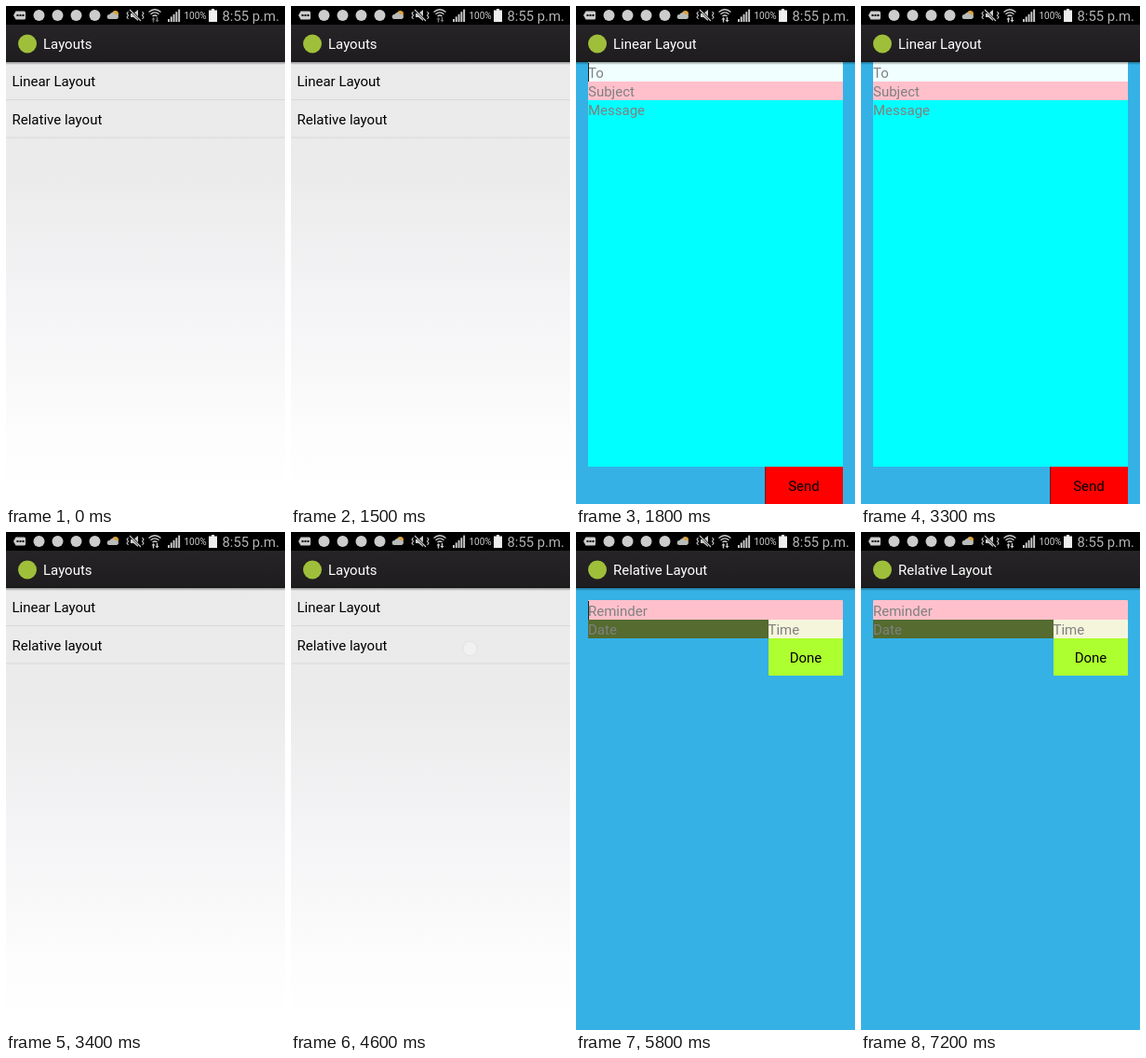
Animation, 300 px wide and 534 px high, one loop 7.7 s. Source, as an HTML page:

```html
<!DOCTYPE html>
<html lang="en">
<head>
<meta charset="utf-8">
<title>Layouts demo</title>
<style>
html, body { margin: 0; width: 100%; height: 100%; overflow: hidden; background: #000; }
svg { display: block; width: 100vw; height: 100vh; }
text { font: 15px Roboto, sans-serif; white-space: pre; }
.hint { fill: #808080; }
</style>
</head>
<body>
<svg viewBox="0 0 300 534" xmlns="http://www.w3.org/2000/svg">
  <defs>
    <linearGradient id="page" x1="0" y1="60" x2="0" y2="534" gradientUnits="userSpaceOnUse">
      <stop offset="0" stop-color="#eaeaea"/>
      <stop offset=".25" stop-color="#ebebec"/>
      <stop offset=".58" stop-color="#f5f4f6"/>
      <stop offset=".85" stop-color="#fdfdfd"/>
      <stop offset="1" stop-color="#fff"/>
    </linearGradient>
    <linearGradient id="bar" x1="0" y1="0" x2="0" y2="1">
      <stop offset="0" stop-color="#262426"/>
      <stop offset="1" stop-color="#1e1c1e"/>
    </linearGradient>
    <linearGradient id="shade" x1="0" y1="0" x2="0" y2="1">
      <stop offset="0" stop-color="#000" stop-opacity=".4"/>
      <stop offset="1" stop-color="#000" stop-opacity="0"/>
    </linearGradient>
  </defs>

  <g id="list">
    <rect y="60" width="300" height="474" fill="url(#page)"/>
    <path d="M0 100.5H300M0 141H300" stroke="#d8d8d8"/>
    <text x="6.5" y="86">Linear Layout</text>
    <text x="6.5" y="126.5">Relative layout</text>
    <circle id="touch" cx="192.5" cy="125" r="7.5" fill="#f1f1f1" stroke="#e4e4e4"/>
  </g>

  <g id="linear">
    <rect y="60" width="300" height="474" fill="#35b1e5"/>
    <rect x="13" y="60" width="274" height="21" fill="#f0ffff"/>
    <rect x="13" y="81" width="274" height="20" fill="#ffc0cb"/>
    <rect x="13" y="101" width="274" height="393" fill="#0ff"/>
    <rect x="203" y="494" width="84" height="40" fill="#f00"/>
    <path d="M203.5 494V534" stroke="#6b1c28"/>
    <text class="hint" x="13" y="76.5">To</text>
    <text class="hint" x="13" y="96.5">Subject</text>
    <text class="hint" x="13" y="117">Message</text>
    <text x="245" y="520" text-anchor="middle">Send</text>
  </g>

  <g id="relative">
    <rect y="60" width="300" height="474" fill="#35b1e5"/>
    <rect x="13" y="73" width="274" height="21" rx="1" fill="#ffc0cb"/>
    <rect x="13" y="94" width="194" height="20" fill="#556b2f"/>
    <rect x="207" y="94" width="80" height="20" fill="#f5f5dc"/>
    <rect x="207" y="114" width="80" height="40" rx="1" fill="#adff2f"/>
    <text class="hint" x="13" y="90">Reminder</text>
    <text class="hint" x="13" y="110">Date</text>
    <text class="hint" x="206.5" y="110">Time</text>
    <text x="247" y="140" text-anchor="middle">Done</text>
  </g>

  <rect id="caret" x="13" width="1" height="20" fill="#222"/>

  <rect y="60" width="300" height="3" fill="url(#shade)"/>
  <rect y="20" width="300" height="40" fill="url(#bar)"/>
  <rect y="59" width="300" height="1" fill="#111"/>
  <circle cx="23" cy="40.5" r="10" fill="#9fbf3b"/>
  <text id="title" x="40" y="46" fill="#fff"></text>

  <rect width="300" height="20" fill="#000"/>
  <g id="status" fill="#ccc">
    <path d="M10.5 5.5H19.5Q21 5.5 21 7V13Q21 14.5 19.5 14.5H10.5L8 10Z"/>
    <path d="M11.5 10h2m1 0h2m1 0h2" stroke="#000" stroke-width="2"/>
    <circle cx="117.500" cy="8.500" r="3.500" fill="#d9a441"/>
    <path d="M111 14a2.500 2.500 0 0 1 .4-5 3.500 3.500 0 0 1 6.200 0 2.500 2.500 0 0 1 1.400 5z" fill="#b8bcb8"/>
    <path d="M134 8h3l5-4v12l-5-4h-3z"/>
    <path d="M133.500 4l11.500 12" stroke="#000" stroke-width="2.500"/>
    <path d="M133 4l12 12M131.500 6l-1.500 2 1.500 2-1.500 2 1.500 2M146.500 6l1.500 2-1.500 2 1.500 2-1.500 2" fill="none" stroke="#ccc" stroke-width="1.100"/>
    <path d="M153.500 6.500q6.500-5.500 13 0M155.500 8.800q4.500-3.800 9 0M157.500 11q2.500-2 5 0" fill="none" stroke="#ccc" stroke-width="1.300"/>
    <path id="data" d="M156.500 14.500l2-2.500 2 2.500h-1.300v3h-1.400v-3zM160.500 15l2 2.500 2-2.500h-1.300v-3h-1.400v3z"/>
    <text x="191.500" y="14" style="font-size:10px">100%</text>
    <path d="M221 3h3v1.500h3V17h-9V4.500h3z" fill="#eee"/>
    <text x="232.500" y="15.500" style="font-size:14.8px" fill="#b4b4b4">8:55 p.m.</text>
  </g>
</svg>
<script>
const LOOP = 7700, BLINK = 500;
const SCENES = [
  { at: 0, id: "list", title: "Layouts" },
  { at: 1800, id: "linear", title: "Linear Layout", caretY: 61 },
  { at: 3400, id: "list", title: "Layouts" },
  { at: 4700, id: "relative", title: "Relative Layout", caretY: 74 }
];
const $ = id => document.getElementById(id);
const show = (id, on) => $(id).setAttribute("visibility", on ? "inherit" : "hidden");

function add(tag, attrs) {
  const el = document.createElementNS("http://www.w3.org/2000/svg", tag);
  for (const key in attrs) el.setAttribute(key, attrs[key]);
  $("status").append(el);
}

for (let i = 0; i < 4; i++) add("circle", { cx: 35.5 + 20 * i, cy: 10, r: 6 });
for (let i = 0; i < 5; i++) {
  const h = 3 + 2.6 * i;
  add("rect", { x: 174 + 2.8 * i, y: 17 - h, width: 1.9, height: h });
}

function draw(t) {
  const scene = SCENES.filter(s => s.at <= t).pop();
  for (const id of ["list", "linear", "relative"]) {
    $(id).setAttribute("display", id === scene.id ? "inline" : "none");
  }
  $("title").textContent = scene.title;

  const hasCaret = scene.caretY !== undefined;
  show("caret", hasCaret && Math.floor((t - scene.at) / BLINK) % 2 === 0);
  if (hasCaret) $("caret").setAttribute("y", scene.caretY);

  show("touch", t >= 4600 && t < 4700);
  $("data").setAttribute("fill", t < 1800 ? "#777" : "#ccc");
}

const start = performance.now();
function tick() {
  draw((performance.now() - start) % LOOP);
  requestAnimationFrame(tick);
}
tick();
</script>
</body>
</html>
```
